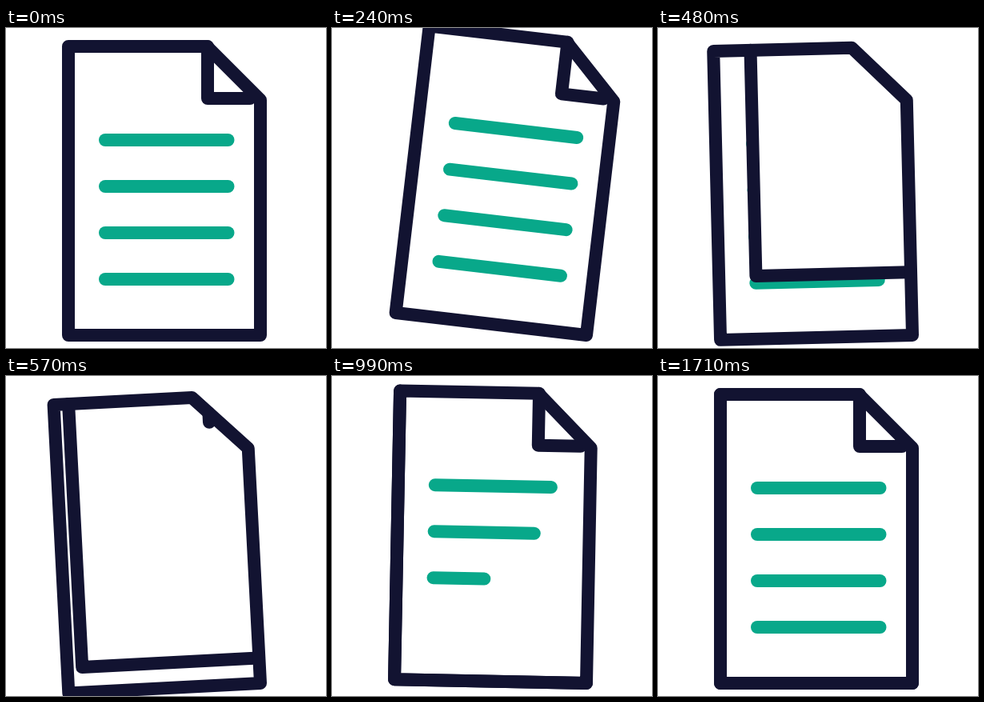
Animation of 400 by 400 pixels, one loop 2400 ms. Source, as an HTML page with a canvas:

```html
<!DOCTYPE html>
<html lang="en">
<head>
<meta charset="utf-8">
<title>Page turn</title>
<style>
html, body { margin: 0; height: 100%; overflow: hidden; background: #fff; }
canvas { display: block; }
</style>
</head>
<body>
<canvas id="stage" width="400" height="400"></canvas>
<script>
const ctx = document.getElementById('stage').getContext('2d');
const INK = '#121331', GREEN = '#08a88a';
const LOOP = 2400, STEP = 30;
const LEFT = 78, TOP = 23, RIGHT = 318, BOTTOM = 384;
const PIVOT = [RIGHT, BOTTOM];
const ROWS = [140, 198, 256, 314];
const LINE_X = 124, LINE_W = 153.5;

// Swing keys: [ms, degrees]
const SWING = [[0, 0], [270, 6.9], [555, -3], [875, 1.85], [1140, 0]];

const clamp = x => Math.min(1, Math.max(0, x));
const mix = (a, b, p) => a + (b - a) * p;
const span = (t, start, length) => clamp((t - start) / length);
const easeOut = x => 1 - (1 - x) ** 2;
const easeInOut = x => (1 - Math.cos(Math.PI * x)) / 2;
const settle = x => (1 - Math.exp(-4.8 * x)) / (1 - Math.exp(-4.8));

function swing(t) {
  for (let i = 1; i < SWING.length; i++) {
    const [t0, a] = SWING[i - 1], [t1, b] = SWING[i];
    if (t < t1) return mix(a, b, easeInOut(span(t, t0, t1 - t0)));
  }
  return 0;
}

function trace(points, close) {
  ctx.beginPath();
  for (const [x, y] of points) ctx.lineTo(x, y);
  if (close) ctx.closePath();
}

function stroke(points, color, close) {
  trace(points, close);
  ctx.strokeStyle = color;
  ctx.stroke();
}

function textLines(progress) {
  ROWS.forEach((y, i) => {
    const p = progress(i);
    if (p > 0) stroke([[LINE_X, y], [LINE_X + LINE_W * p, y]], GREEN);
  });
}

// The folded corner grows until it covers the whole sheet.
function peel(p) {
  const x = mix(252, LEFT, p), y = mix(88, BOTTOM, p);
  trace([[x, TOP], [x, y], [RIGHT, y], [RIGHT, 90], [251, TOP]], true);
  ctx.fillStyle = '#fff';
  ctx.fill();
  stroke([[x, TOP], [x, y], [mix(305, RIGHT, p), y]], INK);
}

// A fresh fold grows out of the diagonal edge.
function newFold(p) {
  const move = (x0, y0, x1, y1) => [mix(x0, x1, p), mix(y0, y1, p)];
  stroke([
    move(275.3, 47.5, 252, TOP),
    move(275.3, 47.5, 252, 88),
    move(265, 37, 305, 88)
  ], INK);
}

function draw(t) {
  ctx.setTransform(1, 0, 0, 1, 0, 0);
  ctx.fillStyle = '#fff';
  ctx.fillRect(0, 0, 400, 400);
  ctx.lineWidth = 16;
  ctx.lineCap = ctx.lineJoin = 'round';

  ctx.translate(...PIVOT);
  ctx.rotate(swing(t) * Math.PI / 180);
  ctx.translate(-PIVOT[0], -PIVOT[1]);

  textLines(() => 1);
  peel(easeOut(span(t, 250, 475)));
  textLines(i => settle(span(t, 619 + 150 * i, 641)));
  if (t > 540) newFold(easeOut(span(t, 540, 310)));
  stroke([[LEFT, TOP], [251, TOP], [RIGHT, 90], [RIGHT, BOTTOM], [LEFT, BOTTOM]], INK, true);
}

const begin = performance.now();
function tick() {
  const t = (performance.now() - begin) % LOOP;
  draw(Math.floor(t / STEP) * STEP);
  requestAnimationFrame(tick);
}
tick();
</script>
</body>
</html>
```
